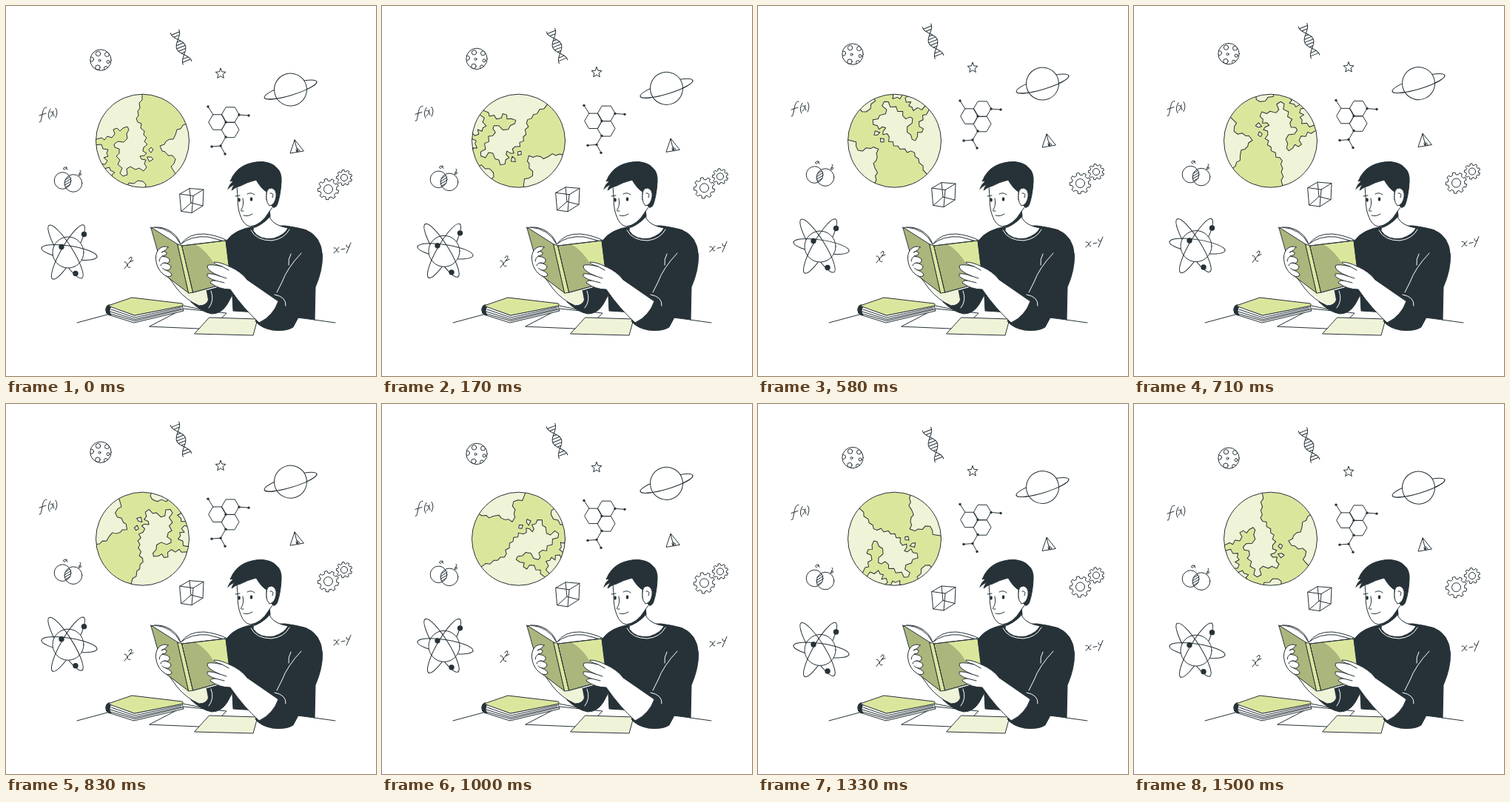
An HTML page for the animation above (1540 ms loop, 500 px wide and 500 px high).

```html
<!DOCTYPE html>
<html lang="en">
<head>
<meta charset="utf-8">
<title>Reading about science</title>
<style>
html, body { margin: 0; width: 100%; height: 100%; overflow: hidden; background: #fff; }
svg { display: block; width: 100vw; height: 100vh; }
.l { fill: none; stroke: #263238; stroke-width: 1; stroke-linecap: round; stroke-linejoin: round; }
.w { fill: #fff; }
.g { fill: #dbe69d; }
.p { fill: #eff3d7; }
.o { fill: #aab67c; }
.d { fill: #263238; }
.s { stroke: #fff; }
.n { stroke: none; }
</style>
</head>
<body>
<svg viewBox="0 0 500 500" xmlns="http://www.w3.org/2000/svg">
  <defs>
    <clipPath id="disc"><circle cx="184.5" cy="182.2" r="63"/></clipPath>
    <clipPath id="moon"><circle cx="128" cy="73" r="14.2"/></clipPath>
  </defs>

  <g clip-path="url(#disc)">
    <g id="globe" class="l">
      <circle class="g n" cx="184.5" cy="182.2" r="63"/>
      <path class="p" d="M184 117L184 127 180 131 181 138 178 142 179 148 176 152 178 157 183 159 182 165 187 169 186 174 190 178 187 183 191 187 186 191 185 196 190 199 187 202 181 203 183 207 189 208 187 213 190 218 186 223 180 219 175 221 168 217 163 220 164 228 158 230 154 226 157 219 151 214 154 208 149 203 153 199 153 193 147 191 146 187 151 183 159 184 164 179 163 173 166 167 164 163 158 165 154 169 150 165 145 167 147 173 143 178 137 176 133 181 129 178 119 181 108 110Z"/>
      <path class="p" d="M247 158L239 161 236 166 231 167 229 174 226 180 221 180 216 183 214 187 208 189 211 196 215 197 219 202 225 202 229 207 227 213 223 217 226 222 231 230 255 235Z"/>
      <path class="p" d="M163 246L166 239 173 240 178 236 185 237 189 241 188 248Z"/>
      <path class="p" d="M119 188L129 187 131 193 138 194 136 199 138 203 132 205 137 209 134 214 128 213 124 218Z"/>
      <path class="p" d="M132 220L140 218 141 222 147 225 143 228 145 233 138 236Z"/>
      <path class="p" d="M193 194L196 191 199 194 196 198Z M191 204L196 204 199 207 194 210Z"/>
    </g>
  </g>
  <circle class="l" cx="184.5" cy="182.2" r="63"/>

  <g id="icons" class="l">
    <circle cx="128" cy="73" r="14.2"/>
    <g clip-path="url(#moon)">
      <circle cx="124.500" cy="64.500" r="3.200"/><circle cx="126.500" cy="73.500" r="1.500"/>
      <circle cx="138" cy="75.500" r="2"/><circle cx="136.500" cy="65.500" r="3"/>
      <circle cx="124" cy="83" r="3.200"/><circle cx="115.500" cy="72" r="3"/><circle cx="135" cy="84" r="2.500"/>
    </g>

    <path id="dna" transform="translate(236.5 55.5) rotate(-22)"/>
    <path id="star"/>

    <g transform="translate(384.500 113) rotate(-17)">
      <ellipse rx="37" ry="7.500"/>
      <circle class="w" r="22"/>
      <path d="M-37 0A37 7.500 0 0 0 37 0"/>
    </g>

    <path id="hexes"/>
    <path d="M280 147L273 136M315 147L328 148M297 177L290 189L278 190M290 189L296 200"/>
    <g id="atoms" class="d n"></g>

    <path d="M55 137Q51 136 49.500 144L47.500 154Q47 158 45 157M45 148L54 145M60 139Q55 147 59 153M60 150Q63 149 64 142M60 143Q64 142 65 149M67 138Q71 143 67 151"/>

    <circle cx="76.500" cy="236" r="11.300"/><circle cx="91" cy="239.500" r="11.800"/>
    <path d="M80 235L86 231M79 239L88 233M79 242L88 237M80 245L87 241"/>
    <path d="M82 218Q78 217 77.500 220Q79 223 82 218Q81 221 83 221M100 222Q102 222 100 225L98 229Q103 229 101 226L99 227"/>

    <g id="orbits"></g>
    <g class="d n"><circle cx="105.500" cy="308.500" r="3.700"/><circle cx="75" cy="325.500" r="3.700"/><circle cx="94" cy="361.500" r="3.700"/></g>

    <path d="M160 346Q163 345 164 350Q165 355 168 353M168 345L160 355M166 342Q168 338 170 340Q171 342 167 346L172 344"/>
    <path d="M443 327Q446 326 447 330Q448 334 450 332M450 326L443 334M453 329L458 328M460 323Q460 328 464 325M466 320L460 334"/>

    <path d="M235 254L248 246.500L267 248L266 270L251 279.500L237 277.500ZM253 256.500L235 254M253 256.500L267 248M253 256.500L251 279.500M250 266L248 246.500M250 266L266 270M250 266L237 277.500"/>
    <path d="M390 181L384 199L402 196ZM390 181L394 197.500M392 194L393 197M394 192L395 197M396 194L397 196"/>
    <path id="gears"/>
    <circle cx="435.500" cy="247.500" r="6"/><circle cx="457" cy="232" r="4.600"/>
  </g>

  <!-- desk -->
  <g class="l">
    <path d="M96 428L137 417M239 405L264 410M416 424L445 428"/>
    <path class="w" d="M194 433L240 409L298 415L283 430L264 436Z"/>
    <path class="p" d="M275 421L340 423L334 445L255 443Z"/>
    <path class="w" d="M139 404Q135 405 135 411Q135 416 138 417L173 428L240 412L238 405L174 418Z"/>
    <path class="d" d="M139 404Q135 405 135 411Q135 416 138 417L142 418Q138 412 142 406Z"/>
    <path d="M142 410L174 421L237 407M141 413L174 423.500L237 409M141 416L174 425.500L239 410"/>
    <path class="g" d="M138 405L170 394L238 402Q241 404 237 405.500L174 418Z"/>
  </g>

  <!-- reader -->
  <g class="l">
    <path class="d" d="M335 298Q309 302 298 317Q296 325 300 345L305 376L307 412L339 414L417 424L418 380Q428 357 427.500 337Q426 311 405 302.500Q393 299 377 297Z"/>
    <path class="w" d="M355 270L357 287Q363 297 381 300Q377 309 362 314Q343 317 334 304Q333 300 337 297Z"/>
    <path class="s" d="M331 303Q338 317 359 317Q376 315 383 302"/>
    <path class="d" d="M334 298Q350 291 356 275L357 284Q350 293 337 299Z"/>
    <path class="w" d="M312 243L313 258Q313 275 317 284Q321 296 330 298Q345 296 355 279L363 268L358 236L330 228Z"/>
    <path class="d" d="M300 247Q302 241 307 237Q305 236 303 237Q309 222 321 216Q333 210 347 210.500Q360 212 365 218Q373 224 372 238Q371 255 367 267Q365 273 361 272L352 262L352 251Q345 247 338 235Q326 238 317 243Q311 244 305 249Q306 245 309 241Q304 243 300 247Z"/>
    <path class="w" d="M352 255Q352 246 359 246Q366 248 365 258Q363 269 356 270Q352 266 352 260Z"/>
    <path d="M357 253Q363 252 360 259M310 257L316 256M326 254Q331 251 336 255M320 260Q322 269 318 275Q316 278 321 277M321 283Q327 285 333 281"/>
    <g class="d n"><ellipse cx="315" cy="262" rx="1.800" ry="2.700"/><ellipse cx="331.500" cy="261" rx="1.800" ry="2.700"/></g>

    <!-- far arm -->
    <path class="d" d="M250 400Q265 414 278 416Q291 416 299 403L307 388L301 376L270 385Z"/>
    <path class="w" d="M209 350Q219 366 231 382Q243 397 261 405Q271 405 273 397L270 380L248 382L230 366Z"/>
    <path class="p n" d="M228 372L248 386L270 381L273 397Q271 404 261 404Q244 396 228 372Z"/>
    <path class="s" d="M277 385Q282 398 274 408"/>

    <!-- open book -->
    <path class="w" d="M196 300Q206 297 218 302Q232 309 236 322Q247 307 268 308Q286 310 299 317L272 321L236 326Z"/>
    <path d="M201 299Q225 301 236 322Q250 310 273 312L292 317"/>
    <path class="o" d="M196 299L232 322L247 388L214 363Z"/>
    <path class="g" d="M232 322L238 324L253 387L247 388Z"/>
    <path class="g" d="M238 324L297 317L304 373L253 387Z"/>
    <path class="o n" d="M239 325L256 322Q272 331 282 350L284 378L253 387Z"/>
    <path d="M238 324L297 317L304 373L253 387Z"/>

    <!-- hands and near arm -->
    <path class="w" d="M219 326Q212 323 206 329Q201 336 203 346Q205 356 212 362Q219 368 224 364Q224 360 216 357Q222 358 223 352Q222 349 214 347Q222 349 221 342Q219 339 211 338Q218 337 217 333Q214 330 210 333Q216 331 219 326Z"/>
    <path d="M211 338Q207 341 207 345M214 347Q209 348 209 351M216 357Q212 356 211 354"/>
    <path class="d" d="M362 394Q383 369 401 337L424 340L417 371Q401 411 388 434Q379 440 360 438Q344 435 337 426Z"/>
    <path class="w" d="M302 352Q318 359 326 370L368 399Q361 419 342 428Q321 409 303 383Q288 383 276 374Q276 371 283 371Q270 367 272 362Q278 361 289 365Q271 358 272 351Q275 348 292 352Q279 348 281 346Q290 346 302 352Z"/>
    <path d="M292 352L301 357M289 365L298 368M283 371L295 374"/>
    <path class="s" d="M363 390Q379 393 378 405M399 334Q380 354 373 373L366 387M385 335Q381 342 382 350"/>
  </g>
</svg>
<script>
const PERIOD = 1540, COUNT = 37, TAU = Math.PI * 2;
const el = id => document.getElementById(id);
const draw = (id, d) => el(id).setAttribute('d', d);
const poly = (pts, closed = true) =>
  'M' + pts.map(p => p.map(v => v.toFixed(2)).join(' ')).join('L') + (closed ? 'Z' : '');
const polar = (cx, cy, r, a) => [cx + r * Math.cos(a), cy + r * Math.sin(a)];
const ring = (n, f) => Array.from({ length: n }, (_, i) => f(i));

function gear(cx, cy, r, teeth, turn) {
  return poly(ring(teeth * 4, i => {
    const out = i % 4 < 2;
    const a = (Math.floor(i / 4) + [0.06, 0.44, 0.54, 0.96][i % 4]) / teeth * TAU + turn;
    return polar(cx, cy, out ? r : r * 0.79, a);
  }));
}

function helix() {
  const x = y => 6.2 * Math.cos(y * Math.PI / 22);
  const strand = k => poly(ring(47, i => [k * x(i - 23), i - 23]), false);
  const rungs = ring(11, i => i * 4 - 20).filter(y => Math.abs(x(y)) > 2)
    .map(y => poly([[-x(y), y], [x(y), y]], false)).join('');
  return strand(1) + strand(-1) + rungs;
}

// Each orbit passes behind the nucleus on one side and in front on the other
function orbits() {
  const paths = [[85.5, 333, 38, 8.8, 9, 1], [80.5, 332, 42, 9.5, 58, 1], [84, 332.5, 42, 9.5, -60, 1]];
  const half = ([x, y, rx, ry, tilt, side], front) =>
    `<path transform="translate(${x} ${y}) rotate(${tilt})" d="M${-rx} 0A${rx} ${ry} 0 0 ${front ? side : 1 - side} ${rx} 0"/>`;
  const all = front => paths.map(p => half(p, front)).join('');
  return all(false) + '<circle class="w" cx="84" cy="333" r="21"/>' + all(true);
}

const hexagon = (cx, cy) => poly(ring(6, i => polar(cx, cy, 11.8, i * TAU / 6)));

draw('dna', helix());
draw('star', poly(ring(10, i => polar(290, 91.5, i % 2 ? 3.2 : 7.3, i * TAU / 10 - TAU / 4))));
draw('hexes', hexagon(303, 147) + hexagon(285.5, 157) + hexagon(303, 167.5));
draw('gears', gear(435.5, 247.5, 14.3, 9, 0.1) + gear(457, 232, 10.7, 9, 0.2));
el('orbits').innerHTML = orbits();
el('atoms').innerHTML = [[273, 136], [315, 147], [328, 148], [297, 157], [297, 177], [290, 189], [278, 190], [296, 200]]
  .map(([x, y]) => `<circle cx="${x}" cy="${y}" r="1.7"/>`).join('');

// Stepped at 24 pictures a second
function render(ms) {
  const step = Math.floor((ms % PERIOD) * 0.024 + 0.15) % COUNT;
  const turn = step / COUNT;
  const phase = 0.28;
  const y = 4.3 * (Math.cos(turn * TAU + phase) - Math.cos(phase));
  el('globe').setAttribute('transform', `rotate(${turn * 360} 184.5 182.2)`);
  el('icons').setAttribute('transform', `translate(0 ${y})`);
}

const start = performance.now();
function tick() {
  render(performance.now() - start);
  requestAnimationFrame(tick);
}
tick();
</script>
</body>
</html>
```
